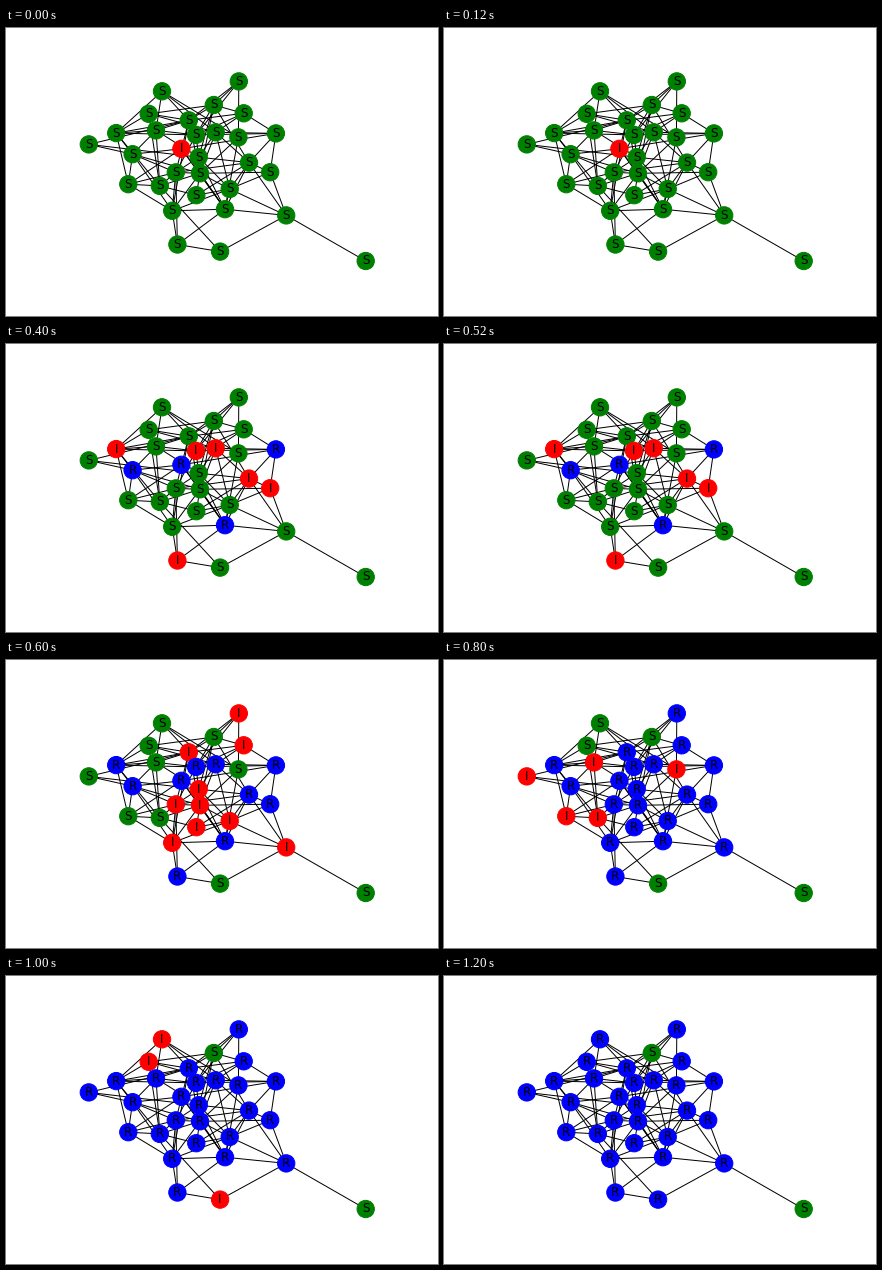
Recreate the animation shown at these times as a matplotlib script. Size 432 px wide and 288 px high, loop 1.4 s.

```python
import matplotlib.pyplot as plt
from matplotlib.animation import FuncAnimation
from matplotlib.collections import LineCollection

WIDTH, HEIGHT, DPI = 432, 288, 72
STEPS, STEP_MS = 7, 200
NEVER = STEPS + 1
COLORS = {"S": "green", "I": "red", "R": "blue"}

# name: x, y, step at which the node becomes infected
NODES = {
    "A": (156, 63.3, 5), "B": (232.8, 53.4, 3), "C": (207.8, 77, NEVER),
    "D": (142.7, 85.8, 5), "E": (237.7, 85.3, 3), "F": (182.8, 92.3, 3),
    "G": (110.2, 105.1, 2), "H": (150, 102.4, 4), "I": (190, 106.9, 2),
    "J": (209.7, 104.3, 2), "K": (232.4, 109.4, 4), "L": (269.9, 105.4, 1),
    "M": (82.8, 116.4, 4), "N": (126.6, 126.2, 1), "O": (175.4, 120.8, 0),
    "P": (192.7, 129.2, 3), "Q": (243, 134.6, 2), "R": (264.2, 144.2, 2),
    "S": (169.8, 144.4, 3), "T": (194, 145.3, 3), "U": (122.3, 156.2, 4),
    "V": (153.8, 157.9, 4), "W": (223.7, 161, 3), "X": (190.3, 167.2, 3),
    "Y": (166.2, 182.8, 3), "Z": (219, 181.2, 1), "a": (280.2, 187.4, 3),
    "b": (171.4, 216.5, 2), "c": (214.1, 223.6, 5), "d": (359.7, 233, NEVER),
}

# each node followed by its neighbours
LINKS = """
A:GHFJK B:CFIK C:DFIPQT D:FGJV E:CFIJL F:GHMSTY
G:HNUVI H:PVIN I:LPS J:LPQTW K:TZ L:OQR M:NP
N:OSTUY O:ZUT P:QSWZ Q:RSWXZa R:TWa S:UVTb T:VYWZ
U:VY V:Xc W:XYZa X:T Y:SZb Z:Tab a:cd b:c
"""


def state(wave, step):
    if step < wave:
        return "S"
    return "I" if step == wave else "R"


points = {name: node[:2] for name, node in NODES.items()}
segments = [
    (points[group[0]], points[other])
    for group in LINKS.split()
    for other in group[2:]
]

fig = plt.figure(figsize=(WIDTH / DPI, HEIGHT / DPI), dpi=DPI, facecolor="white")
ax = fig.add_axes([0, 0, 1, 1])
ax.set_xlim(0, WIDTH)
ax.set_ylim(HEIGHT, 0)
ax.axis("off")

ax.add_collection(LineCollection(segments, colors="black", linewidths=1, zorder=1))
xs, ys = zip(*points.values())
dots = ax.scatter(xs, ys, s=300, linewidths=1, zorder=2)
labels = [
    ax.text(x, y, "S", size=12, family="DejaVu Sans", color="black",
            ha="center", va="center", zorder=3)
    for x, y in points.values()
]


def draw(step):
    states = [state(wave, step) for _, _, wave in NODES.values()]
    colors = [COLORS[s] for s in states]
    dots.set_facecolor(colors)
    dots.set_edgecolor(colors)
    for label, text in zip(labels, states):
        label.set_text(text)
    return [dots, *labels]


anim = FuncAnimation(fig, draw, frames=STEPS, interval=STEP_MS,
                     repeat=True, repeat_delay=0)
plt.show()
```
